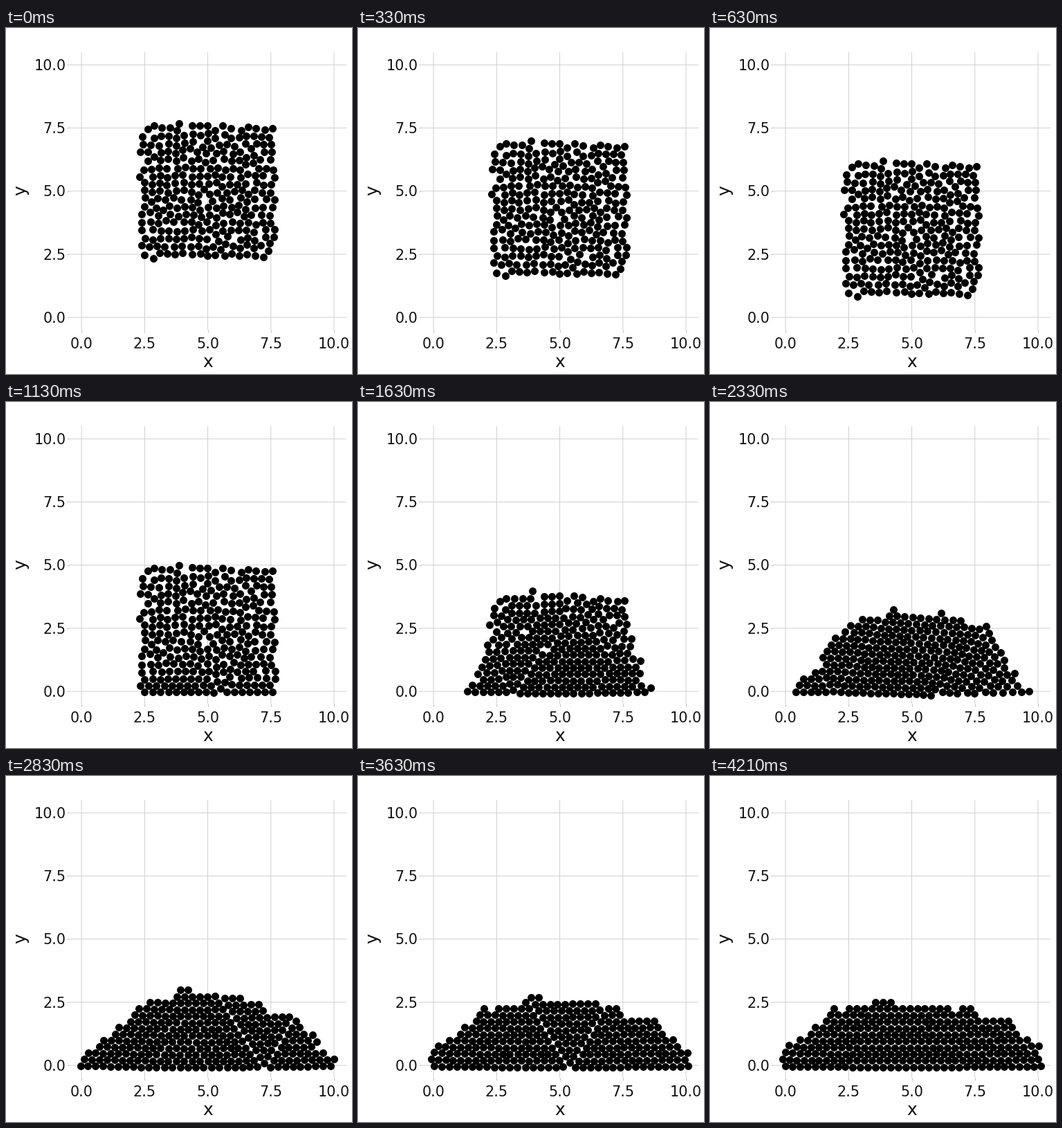
Write a matplotlib script that moves like this. It is 500 by 500 pixels and loops after 4250 ms.

```python
import numpy as np
import matplotlib.pyplot as plt
from matplotlib.animation import FuncAnimation

SIZE, DPI = 500, 100
FRAMES, LOOP_MS = 102, 4250
LEFT, TOP, BOTTOM, SCALE = 90.9, 35.0, 436.4, 36.48  # plot area in pixels
X0, Y0 = LEFT + SCALE / 2, BOTTOM - SCALE / 2

SIDE = 17         # grains along each side of the block
DIAM = 0.301      # grain diameter in data units
FALL = 0.1        # sinking speed per frame
STIFF, WALL = 100, 14
SUBSTEPS = 340
WIDTH = 10        # distance between the walls


def near_pairs(x, y):
    dist = np.hypot(x[:, None] - x, y[:, None] - y)
    return np.nonzero(np.triu(dist < DIAM + 0.2, 1))


def repulsion(x, y, i, j):
    dx, dy = x[i] - x[j], y[i] - y[j]
    r = np.hypot(dx, dy) + 1e-9
    f = STIFF * np.maximum(DIAM - r, 0) / r
    n = len(x)

    def total(w):
        return np.bincount(i, w, n) - np.bincount(j, w, n)

    return total(f * dx), total(f * dy)


def start_block():
    """Jittered square grid, relaxed until no grains overlap."""
    rng = np.random.default_rng(7)
    line = np.linspace(2.5, 7.5, SIDE)
    x, y = (g.ravel() + rng.normal(0, 0.09, g.size)
            for g in np.meshgrid(line, line))
    for step in range(1000):
        if step % 20 == 0:
            i, j = near_pairs(x, y)
        fx, fy = repulsion(x, y, i, j)
        x += fx / SUBSTEPS
        y += fy / SUBSTEPS
    return x, y


def simulate():
    """Overdamped grains sinking onto a soft floor between soft walls."""
    x, y = start_block()
    path = [(x.copy(), y.copy())]
    for _ in range(FRAMES - 1):
        if y.min() > FALL:
            y -= FALL
        else:
            i, j = near_pairs(x, y)
            for _ in range(SUBSTEPS):
                fx, fy = repulsion(x, y, i, j)
                fx += WALL * (np.maximum(-x, 0) - np.maximum(x - WIDTH, 0))
                fy += WALL * np.maximum(-y, 0) - FALL
                x += fx / SUBSTEPS
                y += fy / SUBSTEPS
        path.append((x.copy(), y.copy()))
    return path


def pt(px):
    return px * 72 / DPI


def label(x, y, s, size, ha="center", angle=0):
    fig.text(x / SIZE, 1 - y / SIZE, s, fontsize=pt(size), color="#111111",
             family="DejaVu Sans", ha=ha, va="baseline",
             rotation=angle, rotation_mode="anchor")


fig = plt.figure(figsize=(SIZE / DPI, SIZE / DPI), dpi=DPI, facecolor="white")
ax = fig.add_axes([LEFT / SIZE, 1 - BOTTOM / SIZE,
                   11 * SCALE / SIZE, (BOTTOM - TOP) / SIZE])
ax.set(xlim=(-0.5, 10.5), ylim=(-0.5, 10.5))
ax.spines[:].set_visible(False)
ax.set_axisbelow(True)

ticks = np.arange(0, 10.1, 2.5)
ax.set_xticks(ticks)
ax.set_yticks(ticks)
ax.tick_params(length=pt(3.5), width=pt(1), color="#c0c0c0",
               labelbottom=False, labelleft=False)
ax.grid(color="#d0d0d0", lw=pt(1))
plt.setp(ax.get_xgridlines() + ax.get_ygridlines(), snap=False)

for t in ticks:
    label(X0 + t * SCALE, 463, f"{t:.1f}", 20.8)
    label(86.5, Y0 - t * SCALE + 7.6, f"{t:.1f}", 20.8, ha="right")
label(291.7, 490.5, "x", 25)
label(28.3, 235, "y", 25, angle=90)

grains, = ax.plot([], [], "o", color="black", ms=pt(11), mew=0)
path = simulate()


def draw(n):
    grains.set_data(*path[n])
    return grains,


anim = FuncAnimation(fig, draw, frames=FRAMES, interval=LOOP_MS / FRAMES,
                     repeat=True, repeat_delay=0)
plt.show()
```
